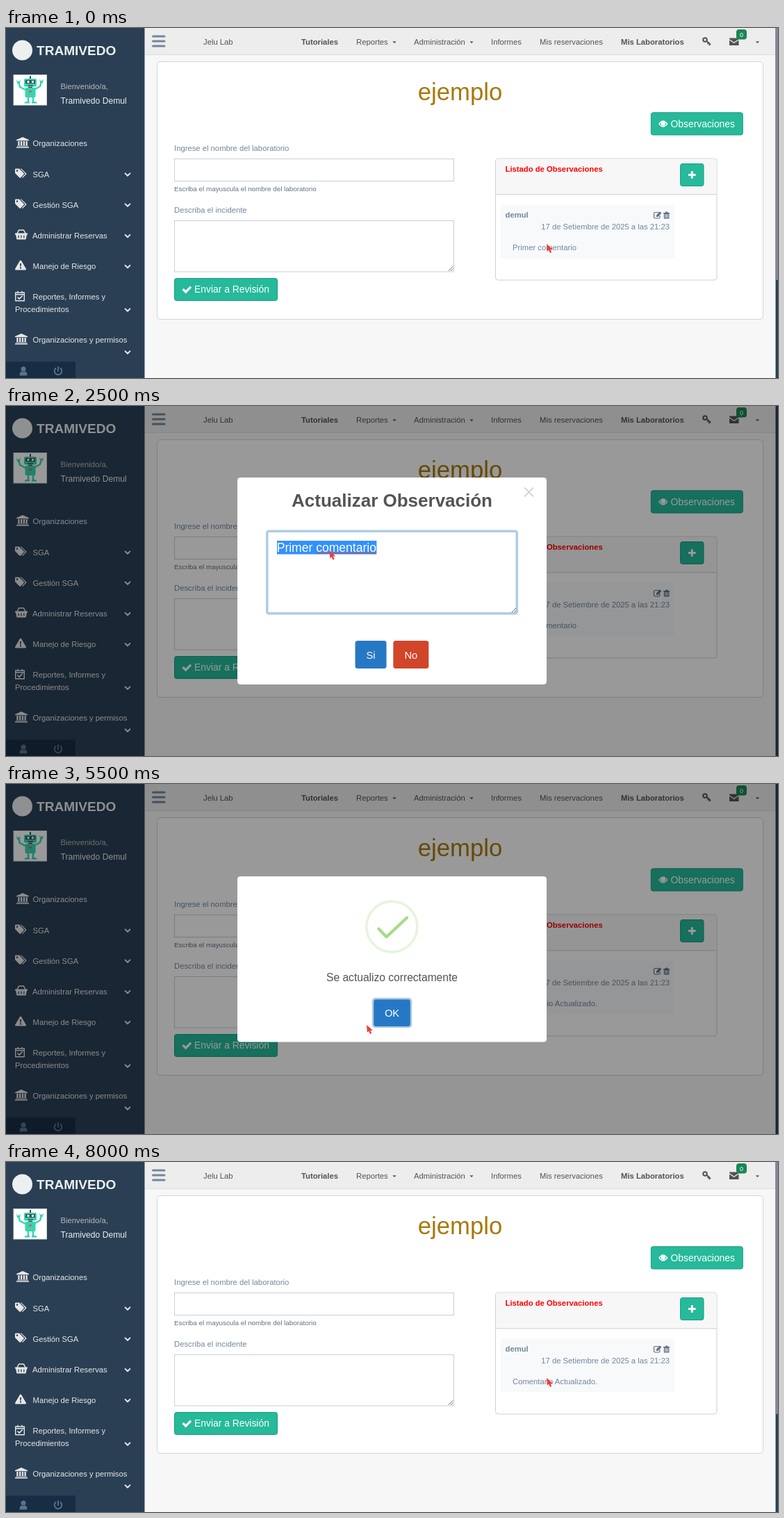
Write an HTML page that moves like this. It is 1111 px wide and 504 px high and loops after 9000 ms.

```html
<!DOCTYPE html>
<html lang="es">
<head>
<meta charset="utf-8">
<title>Observaciones</title>
<style>
  html, body { margin: 0; width: 100%; height: 100%; overflow: hidden; background: #f7f7f7; }
  svg { display: block; width: 100vw; height: 100vh; }
  text { font: 11.27px "Liberation Sans", Arial, sans-serif; white-space: pre; }
  .b { font-weight: bold; }
  .mid { text-anchor: middle; }
  .btn { font-size: 13.87px; fill: #fff; }
  .side { fill: #e7e7e7; }
  .nav { fill: #515356; }
  .muted { fill: #73879c; }
  .field { fill: #fff; stroke: #c8cfd6; }
  .green { fill: #26b99a; stroke: #169f85; }
  .dialog { fill: #545454; }
  .dialog .entry { font-size: 17.55px; }
  .dialog .action { font-size: 14.7px; fill: #fff; }
  .line { fill: none; stroke-linecap: round; stroke-linejoin: round; }
</style>
</head>
<body>
<svg viewBox="0 0 1111 504" preserveAspectRatio="none">
  <defs>
    <path id="bank" d="M9 0L18 4v1.3H0V4zM2.3 6h2.3v6H2.3zM6 6h2.3v6H6zM9.8 6h2.3v6H9.8zM13.5 6h2.3v6h-2.3zM1.2 12.4h15.6v1.2H1.2zM0 14.2h18v1.6H0z"/>
    <path id="tags" fill-rule="evenodd" d="M0 1.5Q0 .5 1 .5H6L12.6 7.2Q13.3 8 12.6 8.8L8 13.4Q7.2 14 6.4 13.4L0 7zM3 2.2a1.3 1.3 0 1 0 .1 0zM7.6.5H9L16 7.2Q16.8 8 16 8.8L11.3 13.5Q10.5 14 9.8 13.3L14.2 8.8Q14.8 8 14.2 7.2z"/>
    <g id="basket">
      <path class="line" stroke="currentColor" stroke-width="1.5" d="M3 6L5.500 1H12.500L15 6"/>
      <path fill-rule="evenodd" d="M0 5.500H18V7.500H17L15.500 14.500H2.500L1 7.500H0zM4.500 8.500V12.500H5.800V8.500zM8.300 8.500V12.500H9.600V8.500zM12.200 8.500V12.500H13.500V8.500z"/>
    </g>
    <path id="warning" fill-rule="evenodd" d="M8 0Q8.700 0 9 .6L16 12.600Q16.300 14 15 14H1Q-.3 14 0 12.600L7 .6Q7.300 0 8 0zM7 4.500L7.300 9H8.700L9 4.500zM7 10V12H9V10z"/>
    <g id="calendar" class="line" stroke="currentColor" stroke-width="1.4">
      <path d="M.7 2.500H13.300V14.300H.7zM.7 5.300H13.300M4 .7V3M10 .7V3"/>
      <path d="M4 9.500L6.200 11.700L10.200 7.500" stroke-width="1.7"/>
    </g>
    <path id="chevron" class="line" stroke="#e7e7e7" stroke-width="2" d="M-3.400 -1.600L0 1.800L3.400 -1.600"/>
    <path id="caret-down" class="nav" d="M-2.700 -1.300H2.700L0 1.400z"/>
    <path id="grip" class="line" stroke="#555" stroke-width=".9" d="M-7 -1L-1 -7M-3.500 -1L-1 -3.500"/>
    <pattern id="wave" width="4" height="4" patternUnits="userSpaceOnUse" y="210">
      <path d="M-1 .5L0 .7L2 3L4 .7L5 .5" fill="none" stroke="#e8363a" stroke-width="1"/>
    </pattern>
  </defs>

  <rect x="200" width="908" height="504" fill="#f7f7f7"/>
  <rect x="200" width="908" height="38" fill="#ededed"/>
  <path d="M200 38.500H1108" stroke="#d9dee4"/>
  <rect x="1107.500" width="4" height="504" fill="#2a3f54"/>
  <rect id="thumb" x="1107.500" width="4" height="363" fill="#85849a"/>

  <!-- Sidebar -->
  <rect width="199.500" height="504" fill="#2a3f54"/>
  <circle cx="23.500" cy="32" r="14.500" fill="#ecf0f1"/>
  <text class="b" x="44" y="39" style="font-size:19.070px" fill="#ecf0f1">TRAMIVEDO</text>
  <rect x="11" y="67.500" width="47.500" height="43.500" fill="#fff" stroke="#d5dade"/>
  <g id="robot" fill="#35d6ae">
    <path class="line" stroke="#35d6ae" stroke-width="2.500" d="M28 89L20 85L18 78M42 88L49 84L51 77M32 99V106M39 99V106"/>
    <path d="M15 74L18 79L21 74L20 80H16zM48 73L51 78L54 73L53 79H49z"/>
    <rect x="26" y="73" width="18" height="11.500" rx="2"/>
    <rect x="27.500" y="86" width="15" height="14" rx="2"/>
    <path d="M28 106h6v2.500h-8zM37 106h6l2 2.500h-8z"/>
    <path fill="#31545b" d="M34 69h2v4h-2zM28 75h14v5H28zM31 82h8v1.300h-8zM32 84.500h6V86h-6z"/>
    <path fill="#ef5b5b" d="M33 90h4v3h-4z"/>
    <circle cx="32" cy="77.500" r="1.700" fill="#fff"/><circle cx="38.500" cy="77.500" r="1.700" fill="#fff"/>
  </g>
  <text x="78.500" y="88" fill="#bab8b8">Bienvenido/a,</text>
  <text x="78.500" y="108.500" style="font-size:12.130px" fill="#ecf0f1">Tramivedo Demul</text>

  <g class="side" color="#e7e7e7">
    <use href="#bank" x="15" y="157"/>
    <use href="#tags" x="13" y="202"/>
    <use href="#tags" x="13" y="246"/>
    <use href="#basket" x="13" y="290"/>
    <use href="#warning" x="13" y="334.500"/>
    <use href="#calendar" x="13" y="378.500"/>
    <use href="#bank" x="13" y="440"/>
    <text x="38.500" y="170">Organizaciones</text>
    <text x="38.500" y="214.500">SGA</text>
    <text x="38.500" y="258.500">Gestión SGA</text>
    <text x="38" y="303">Administrar Reservas</text>
    <text x="38.500" y="347">Manejo de Riesgo</text>
    <text x="38.500" y="391">Reportes, Informes y</text>
    <text x="13" y="409">Procedimientos</text>
    <text x="38.500" y="453">Organizaciones y permisos</text>
  </g>
  <use href="#chevron" x="175" y="211"/>
  <use href="#chevron" x="175" y="255"/>
  <use href="#chevron" x="175" y="299.500"/>
  <use href="#chevron" x="175" y="343.500"/>
  <use href="#chevron" x="175" y="406"/>
  <use href="#chevron" x="175" y="467"/>
  <rect y="480.500" width="100" height="24" fill="#172d44"/>
  <g fill="#5a738e">
    <circle cx="25" cy="491" r="3.500"/>
    <path d="M19.500 500.500Q19.500 494.500 23 494.500Q25 496 27 494.500Q30.500 494.500 30.500 500.500z"/>
  </g>
  <path class="line" stroke="#5a738e" stroke-width="1.800" d="M71.500 490A5.300 5.300 0 1 0 78.500 490M75 488V494"/>

  <!-- Top bar -->
  <path class="line" stroke="#73879c" stroke-width="3" d="M211.500 12H228M211.500 19H228M211.500 26H228"/>
  <g class="nav">
    <text x="284" y="24">Jelu Lab</text>
    <text class="b" x="425" y="24">Tutoriales</text>
    <text x="504" y="24">Reportes</text>
    <text x="587" y="24">Administración</text>
    <text x="698" y="24">Informes</text>
    <text x="768" y="24">Mis reservaciones</text>
    <text class="b" x="885" y="24">Mis Laboratorios</text>
    <use href="#caret-down" x="559" y="20.500"/>
    <use href="#caret-down" x="670" y="20.500"/>
    <use href="#caret-down" x="1081.500" y="20.500"/>
    <circle cx="1006" cy="17" r="2.800" fill="none" stroke="#515356" stroke-width="2"/>
    <path class="line" stroke="#515356" stroke-width="1.800" d="M1008.500 19L1013.500 23.500M1010 22.500L1011.300 21M1012 24.300L1013.200 23"/>
    <path d="M1041 14.500H1054.500V16L1047.700 20.500L1041 16zM1041 17.500L1047.700 22L1054.500 17.500V25H1041z"/>
  </g>
  <rect x="1051" y="2" width="15" height="14.500" rx="4" fill="#198754"/>
  <text class="mid" x="1058.500" y="12.500" style="font-size:9px" fill="#fff">0</text>

  <!-- Form -->
  <rect x="217.500" y="48.500" width="872" height="371" rx="5" fill="#fff" stroke="#d2d3d4"/>
  <text class="mid" x="653.500" y="104" style="font-size:34.670px" fill="#a87909">ejemplo</text>
  <rect class="green" x="928.300" y="121.800" width="132" height="32.200" rx="3"/>
  <path fill="#fff" fill-rule="evenodd" d="M939 138Q945.500 128.500 952.500 138Q945.500 147.500 939 138zM940.800 138Q945.500 144.500 950.700 138Q949.700 136.300 948.300 135.300A3.300 3.300 0 1 1 943.200 135.300Q941.700 136.300 940.800 138z"/>
  <text class="btn" x="956.500" y="142.500">Observaciones</text>
  <g class="muted">
    <text x="242" y="177">Ingrese el nombre del laboratorio</text>
    <text x="242" y="235" style="font-size:9.860px" fill="#5f6f80">Escriba el mayuscula el nombre del laboratorio</text>
    <text x="242" y="265.500">Describa el incidente</text>
  </g>
  <rect class="field" x="242.500" y="188.500" width="402" height="32"/>
  <rect class="field" x="242.500" y="277.500" width="402" height="73.500"/>
  <use href="#grip" x="644" y="350.500"/>
  <rect class="green" x="242.500" y="360.500" width="148" height="32" rx="3"/>
  <path fill="none" stroke="#fff" stroke-width="3.200" d="M254.500 376L258.700 380.200L266 372.700"/>
  <text class="btn" x="271" y="381">Enviar a Revisión</text>

  <!-- Observation list -->
  <rect x="704.500" y="188" width="318.500" height="175" rx="4" fill="#fff" stroke="#cfcfcf"/>
  <path d="M705 240V191.500Q705 188.500 708 188.500H1019.500Q1022.500 188.500 1022.500 191.500V240z" fill="#f7f7f7"/>
  <path d="M704.500 239.800H1023" stroke="#cfcfcf"/>
  <text class="b" x="718.500" y="207" fill="#f00">Listado de Observaciones</text>
  <rect class="green" x="970.500" y="195.500" width="33.500" height="32" rx="3"/>
  <path stroke="#fff" stroke-width="3" d="M982 211.500H992.500M987.300 206.200V216.800"/>
  <rect x="712" y="254.500" width="250" height="77" fill="#f7f9fb"/>
  <g class="muted">
    <text class="b" x="718.500" y="273">demul</text>
    <text x="955" y="290" text-anchor="end">17 de Setiembre de 2025 a las 21:23</text>
    <text id="comment" x="729" y="320"></text>
    <path class="line" stroke="#5e7185" stroke-width="1.200" d="M939 265.500H934Q932.500 265.500 932.500 267V272.500Q932.500 274 934 274H939.500Q941 274 941 272.500V270.500"/>
    <path fill="#5e7185" d="M936 272V269.500L941 264.300L943.300 266.700L938.300 272z"/>
    <path fill="#5e7185" fill-rule="evenodd" d="M946 266H949L949.500 264.500H952L952.500 266H955V267.300H954.300V274.500H946.800V267.300H946zM948.300 268V273.300H949.200V268zM950.100 268V273.300H951V268zM951.900 268V273.300H952.800V268z"/>
  </g>

  <rect id="shade" width="1111" height="504" fill="#000" opacity=".4"/>

  <!-- Edit dialog -->
  <g id="editor" class="dialog">
    <rect x="333" y="103" width="445" height="298" rx="4.300" fill="#fff"/>
    <path class="line" stroke="#ccc" stroke-width="1.700" d="M746.500 118L758.500 130M758.500 118L746.500 130"/>
    <text class="b mid" x="555.500" y="145" style="font-size:26px">Actualizar Observación</text>
    <rect x="375.700" y="180.200" width="359.600" height="118.600" rx="2.500" fill="#fff" stroke="#afcde5" stroke-width="3.500"/>
    <use href="#grip" x="735" y="298"/>
    <rect id="selection" x="390" y="194" width="143.300" height="19.500" fill="#3390ff"/>
    <text id="entry" class="entry" x="389.700" y="210"></text>
    <rect id="wave1" y="210" height="4" fill="url(#wave)"/>
    <rect id="wave2" x="485.500" y="210" width="93" height="4" fill="url(#wave)"/>
    <rect id="caret" y="194" width="1" height="19"/>
    <rect id="yes" x="502.500" y="338" width="45" height="40" rx="3.500"/>
    <rect x="557.300" y="338" width="51" height="40" rx="3.500" fill="#d14529"/>
    <text class="action mid" x="525" y="363.500">Si</text>
    <text class="action mid" x="582.800" y="363.500">No</text>
  </g>

  <!-- Success dialog -->
  <g id="success" class="dialog">
    <rect x="333" y="133" width="445" height="238.500" rx="4.300" fill="#fff"/>
    <circle cx="555.300" cy="205.500" r="36.500" fill="none" stroke="#e4f5db" stroke-width="3.500"/>
    <path class="line" stroke="#a5dc86" stroke-width="4.300" d="M536.300 208.500L547.500 220.300L577 192.500"/>
    <text class="mid" x="555.500" y="284" style="font-size:15.600px">Se actualizo correctamente</text>
    <rect x="526.700" y="307.700" width="57.600" height="43.600" rx="5" fill="#b1cae3"/>
    <rect id="ok" x="529.200" y="310.200" width="52.600" height="38.800" rx="3.500"/>
    <text class="action mid" x="555.500" y="335">OK</text>
  </g>

  <path id="cursor" fill="#f23c3c" d="M0 0L.8 10.800L3 8.800L5 13L7.200 12L5.300 8L8.800 7.800z"/>
</svg>
<script>
  const LOOP = 9000;
  const OLD_TEXT = "Primer comentario", NEW_TEXT = "Comentario Actualizado.";
  const BLUE = "#2778c4", BLUE_HOVER = "#236cb0";
  const cursorStops = [
    [0, 778, 311], [500, 932.5, 266], [2000, 465.5, 208.5],
    [5000, 519, 347], [6500, 542, 319], [8000, 778, 311]
  ];
  const el = id => document.getElementById(id);
  const show = (id, on) => el(id).style.display = on ? "" : "none";
  const set = (id, attrs) => {
    for (const name in attrs) el(id).setAttribute(name, attrs[name]);
  };

  function draw(t) {
    const during = (from, to) => t >= from && t < to;
    const modal = during(1000, 7000), selected = during(2500, 4000), typed = t >= 4000;

    show("shade", modal);
    show("thumb", !modal);
    show("editor", during(1000, 5500));
    show("success", during(5500, 7000));
    el("comment").textContent = t < 5500 ? OLD_TEXT : NEW_TEXT;

    el("entry").textContent = typed ? NEW_TEXT : OLD_TEXT;
    el("entry").style.fill = selected ? "#fff" : "";
    show("selection", selected);
    show("caret", t >= 1500 && !selected);
    set("caret", { x: typed ? 580 : 533 });
    set("wave1", typed ? { x: 390, width: 90.5 } : { x: 446.5, width: 86.5 });
    show("wave2", typed);

    set("yes", { fill: t >= 5000 ? BLUE_HOVER : BLUE });
    set("ok", { fill: t >= 6500 ? BLUE_HOVER : BLUE });

    const [, x, y] = cursorStops.filter(([start]) => start <= t).pop();
    set("cursor", { transform: `translate(${x} ${y})` });
  }

  const began = performance.now();
  function tick() {
    draw((performance.now() - began) % LOOP);
    requestAnimationFrame(tick);
  }
  tick();
</script>
</body>
</html>
```
